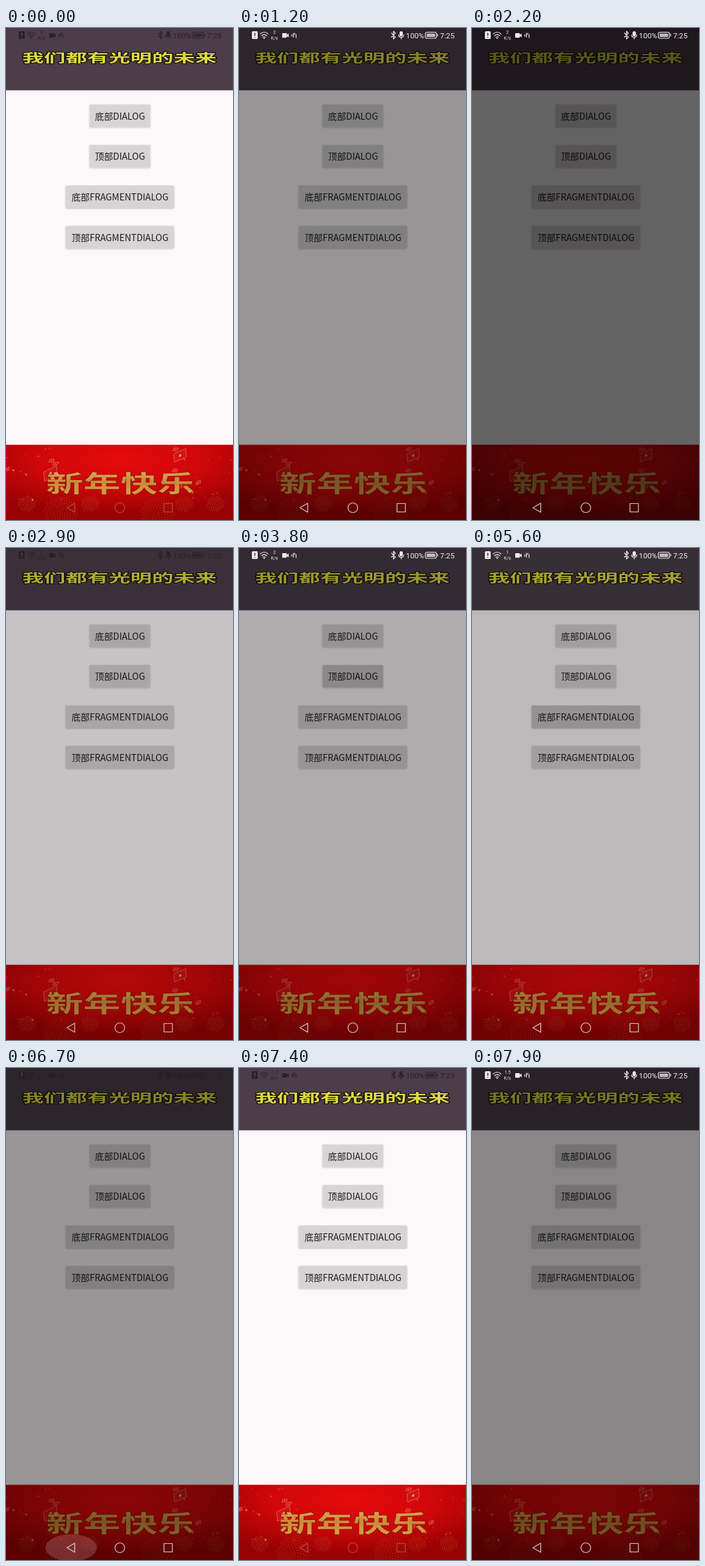
Animation, 352 px wide and 762 px high, one loop 8000 ms. Source, as an HTML page:

```html
<!DOCTYPE html>
<html lang="zh">
<head>
<meta charset="utf-8">
<style>
html, body { margin: 0; width: 100%; height: 100%; overflow: hidden; background: #fcf8f9; }
svg { display: block; width: 100%; height: 100%; }
text { font-family: Roboto, "Noto Sans CJK SC", sans-serif; text-anchor: middle; }
.cjk { font-family: "Noto Sans CJK SC", "Noto Sans CJK", sans-serif; }
.banner { font-weight: 700; paint-order: stroke; stroke-linejoin: round; }
.btn { font-size: 14px; font-weight: 500; fill: #1c1c1c; }
.line { fill: none; stroke: currentColor; stroke-width: 1.2; stroke-linecap: round; stroke-linejoin: round; }
</style>
</head>
<body>
<svg viewBox="0 0 352 762">
  <defs>
    <radialGradient id="red" cx=".5" cy=".2" r=".72">
      <stop stop-color="#e60a0c"/><stop offset=".5" stop-color="#d00709"/><stop offset="1" stop-color="#980204"/>
    </radialGradient>
    <linearGradient id="gold" x2="0" y2="1">
      <stop stop-color="#e8b95c"/><stop offset=".5" stop-color="#c98a3a"/><stop offset="1" stop-color="#dca548"/>
    </linearGradient>
    <linearGradient id="sky">
      <stop stop-color="#c873e4"/><stop offset=".3" stop-color="#7e62ee"/>
      <stop offset=".75" stop-color="#f063ce"/><stop offset="1" stop-color="#ff937c"/>
    </linearGradient>
    <filter id="soft" x="-10%" y="-20%" width="120%" height="150%">
      <feDropShadow dx="0" dy=".7" stdDeviation=".8" flood-opacity=".25"/>
    </filter>
  </defs>

  <rect width="352" height="762" fill="#fcf8f9"/>
  <rect width="352" height="96.500" fill="#4b3d49"/>
  <text class="cjk banner" transform="translate(176 53) scale(1.8 1)" font-size="18.600" fill="#dfd846" stroke="#15110c" stroke-width="2">我们都有光明的未来</text>
  <g id="buttons"></g>
  <rect y="645.500" width="352" height="117" fill="url(#red)"/>
  <g id="festive"></g>
  <text class="cjk banner" transform="translate(177.500 718.500) scale(1.6 1)" font-size="36" fill="url(#gold)" stroke="#96100a" stroke-width="1.500">新年快乐</text>

  <rect id="dim" width="352" height="762"/>
  <rect id="panel" width="352" height="97" fill="url(#sky)"/>
  <ellipse id="ripple" cx="101" cy="743" rx="40" ry="21" fill="#fff"/>
  <g id="touch" fill="#d6d2d6">
    <circle cx="63" cy="331" r="13" opacity=".25"/><circle cx="63" cy="331" r="10.500" opacity=".8"/>
  </g>

  <g id="status" fill="currentColor">
    <rect x="20" y="5" width="9" height="12" rx="1.500"/>
    <path id="mark" d="M24.500 7.500v4.500M24.500 14v1" stroke-width="1.500"/>
    <path class="line" d="M33 9q6-5 12 0M35 11.800q4-3.400 8 0M37 14.300q2-1.600 4 0"/>
    <circle cx="39" cy="16" r="1"/>
    <text id="speed" x="55" y="9" font-size="7"></text>
    <text x="55" y="18" font-size="7">K/s</text>
    <path d="M67 8h7v2.500l3-2v6l-3-2v2.500h-7z"/>
    <path class="line" d="M82 10v3M84.500 8v6M86.500 8v2M88.500 10v5"/>
    <path class="line" d="M236.500 8l6 6-3 3V5l3 3-6 6"/>
    <rect x="249" y="5" width="5" height="8" rx="2.500"/>
    <path class="line" d="M247.500 10.500q0 4 4 4t4-4M251.500 14.500v2.500"/>
    <text x="273" y="15.500" font-size="11.700">100%</text>
    <rect class="line" x="289" y="6.500" width="17" height="9.500" rx="2.500"/>
    <rect x="291" y="8.500" width="13" height="5.500" rx="1" opacity=".75"/>
    <path class="line" d="M308 9.500v3"/>
    <text x="323" y="15.500" font-size="11.700">7:25</text>
  </g>
  <g id="nav" class="line" color="#e9e1e1">
    <path d="M106.500 736v14l-12-7z"/><circle cx="176.500" cy="743" r="7.500"/><rect x="245" y="736.500" width="13" height="13"/>
  </g>
</svg>
<script>
const $ = id => document.getElementById(id);
const set = (el, attrs) => Object.entries(attrs).forEach(([k, v]) => el.setAttribute(k, v));

const dialogs = [
  { label: '底部DIALOG', open: 1078, close: 2782 },
  { label: '顶部DIALOG', open: 3700, close: 4765, top: true },
  { label: '底部FRAGMENTDIALOG', open: 5511, close: 6623 },
  { label: '顶部FRAGMENTDIALOG', open: 7763, close: 9000, top: true }
];
$('buttons').innerHTML = dialogs.map(({ label }, i) => {
  const w = label.length > 8 ? 168 : 94, y = 118.5 + 62.7 * i;
  return `<rect x="${176.5 - w / 2}" y="${y}" width="${w}" height="35" rx="1.5" filter="url(#soft)"/>
    <text class="cjk btn" x="176.8" y="${y + 23}">${label}</text>`;
}).join('');
const faces = $('buttons').querySelectorAll('rect');

// Seeded festive decoration
let seed = 11;
const rnd = () => (seed = seed * 16807 % 2147483647) / 2147483647;
const sideX = () => (rnd() * 180 + 262) % 352;

// Sunflower spiral of dots
function firework(x, y, r) {
  let d = '';
  for (let n = 0; n < r * 5; n++) {
    const q = r * Math.sqrt(n / r / 5), a = n * 2.4;
    d += `M${x + q * Math.cos(a)} ${y + q * .85 * Math.sin(a)}h.1`;
  }
  return `<path d="${d}" stroke="#d98a42" stroke-width="1.2" stroke-linecap="round" opacity=".55"/>`;
}
function envelope(x, y, w, angle) {
  return `<g transform="translate(${x} ${y}) rotate(${angle}) skewX(-20)">
    <rect x="${-w / 2}" y="${-w * .3}" width="${w}" height="${w * .6}" fill="#d21318" stroke="#e87466" stroke-width=".7"/>
    <circle r="${w * .1}" fill="#e5a852"/></g>`;
}
let art = '';
for (const x of [32, 85, 130, 236, 276, 325]) {
  const big = x === 85 || x === 236;
  art += firework(x, big ? 749 : 737, big ? 27 : 14);
}
for (let i = 0; i < 50; i++) {
  const fill = i % 3 ? '#e2483a' : '#e5a25c', s = 1 + rnd() * 2.4;
  art += `<rect width="${s}" height="${s * .8}" fill="${fill}" opacity="${.3 + rnd() * .5}"
    transform="translate(${sideX()} ${649 + rnd() * 80}) rotate(${rnd() * 90})"/>`;
}
art += envelope(270, 662, 20, -24) + envelope(69, 690, 22, -25);
for (let i = 0; i < 7; i++) art += envelope(sideX(), 652 + rnd() * 65, 7, rnd() * 60 - 30);
$('festive').innerHTML = art;

// Rises to 1 at a, falls back to 0 at b, 200 ms each
function ease(x) {
  x = Math.max(0, Math.min(1, x));
  return x * x * (3 - 2 * x);
}
const pulse = (t, a, b) => ease((t - a) / 200) - ease((t - b) / 200);
const within = (t, a, b) => t >= a && t < b;

function draw(now) {
  const t = now % 8000;
  let dim = 0, slide = 0, light = false;
  dialogs.forEach(({ open, close, top }, i) => {
    dim += .6 * pulse(t, open, close);
    if (top) slide += pulse(t, open + 140, close - 85);
    light ||= within(t, open + 50, close - 20);
    set(faces[i], { fill: within(t, open - 100, open + 110) ? '#c8c4c5' : '#d7d4d5' });
  });
  set($('dim'), { opacity: dim });
  set($('panel'), { y: 97 * (slide - 1) });
  set($('status'), { color: light ? '#eeeaf0' : '#261c28', opacity: light ? 1 : .85 });
  set($('mark'), { stroke: light ? '#30263a' : '#65566d' });
  set($('nav'), { opacity: .3 + .6 * Math.min(1, dim * 4) });
  set($('touch'), { opacity: within(t, 4640, 4860) ? 1 : 0 });
  set($('ripple'), { opacity: .16 * pulse(t, 6450, 6700) });
  $('speed').textContent = t < 5300 ? '2' : t < 7300 ? '1' : '1.5';
  requestAnimationFrame(draw);
}
requestAnimationFrame(draw);
</script>
</body>
</html>
```
